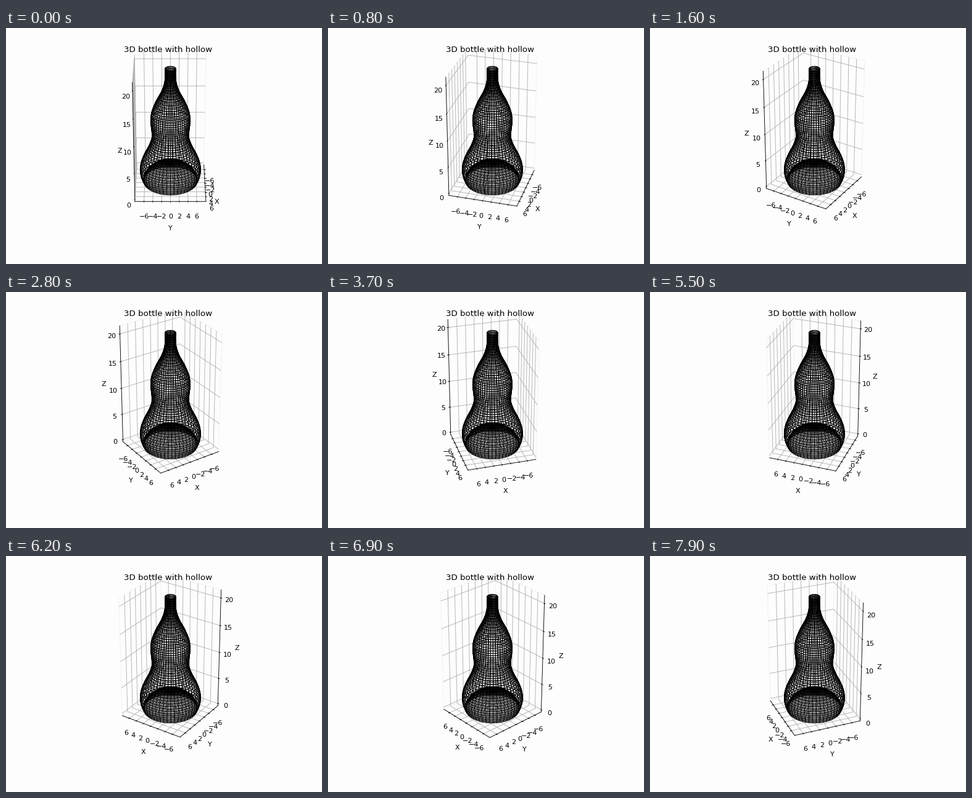
These frames come from a looping animation (512x384 px, 8000 ms). A matplotlib script:

```python
import numpy as np
import matplotlib.pyplot as plt
from matplotlib.animation import FuncAnimation

FRAMES = 80
STEP_MS = 100
HEIGHT = 21
HALF = 7.75
BACKGROUND = "#fdfdfd"

# Outer wall: height and radius at a few stations
STATIONS = np.array([
    (0, 6.3), (1, 6.82), (2, 7.03), (3.2, 6.87), (4.6, 6.22), (6.5, 5.0),
    (8.6, 4.18), (10, 4.3), (11.4, 4.47), (12.7, 4.34), (14.65, 3.45),
    (17.1, 1.85), (18.5, 1.3), (19.6, 1.17), (21, 1.17),
])


def smooth(x, xs, ys):
    """Cubic Hermite curve through the given stations."""
    slopes = np.gradient(ys, xs)
    i = np.clip(np.searchsorted(xs, x) - 1, 0, len(xs) - 2)
    h = xs[i + 1] - xs[i]
    t = (x - xs[i]) / h
    return ((1 + 2 * t) * (1 - t) ** 2 * ys[i]
            + t * (1 - t) ** 2 * h * slopes[i]
            + t * t * (3 - 2 * t) * ys[i + 1]
            + t * t * (t - 1) * h * slopes[i + 1])


def revolve(ax, radius, z, width):
    theta = np.linspace(0, 2 * np.pi, 50)
    ax.plot_wireframe(np.outer(radius, np.cos(theta)),
                      np.outer(radius, np.sin(theta)),
                      np.outer(z, np.ones_like(theta)),
                      rstride=1, cstride=1, color="black", linewidth=width)


fig = plt.figure(figsize=(6.4, 4.8), dpi=80, facecolor=BACKGROUND)
ax = fig.add_subplot(projection="3d", facecolor=BACKGROUND)

# Slim, tall box: scale the data before the usual projection
base_proj = ax.get_proj
ax.get_proj = lambda: base_proj() @ np.diag([0.6, 0.6, 1.5, 1])

z = np.linspace(0, HEIGHT, 50)
revolve(ax, smooth(z, *STATIONS.T), z, 0.8)

# Hollow pushed up into the base
t = np.linspace(0, np.pi / 2, 50)
revolve(ax, 6.3 * np.cos(t), 3.3 * np.sin(t), 0.45)

edge = HALF * 25 / 24
pad = HEIGHT / 48
ax.set(title="3D bottle with hollow", xlabel="X", ylabel="Y", zlabel="Z",
       xticks=range(-6, 7, 2), yticks=range(-6, 7, 2), zticks=range(0, 21, 5))
ax.set(xlim=(-edge, edge), ylim=(-edge, edge), zlim=(-pad, HEIGHT + pad))
for axis in (ax.xaxis, ax.yaxis, ax.zaxis):
    axis.set_pane_color(BACKGROUND)
    axis.pane.set_edgecolor("#f3f3f3")


def update(i):
    # The tiny offset keeps edge-on views from being ambiguous
    ax.view_init(elev=30, azim=1e-3 + 1.9999 * i)
    return []


anim = FuncAnimation(fig, update, frames=FRAMES, init_func=lambda: update(0),
                     interval=STEP_MS, repeat=True, repeat_delay=0)
plt.show()
```
